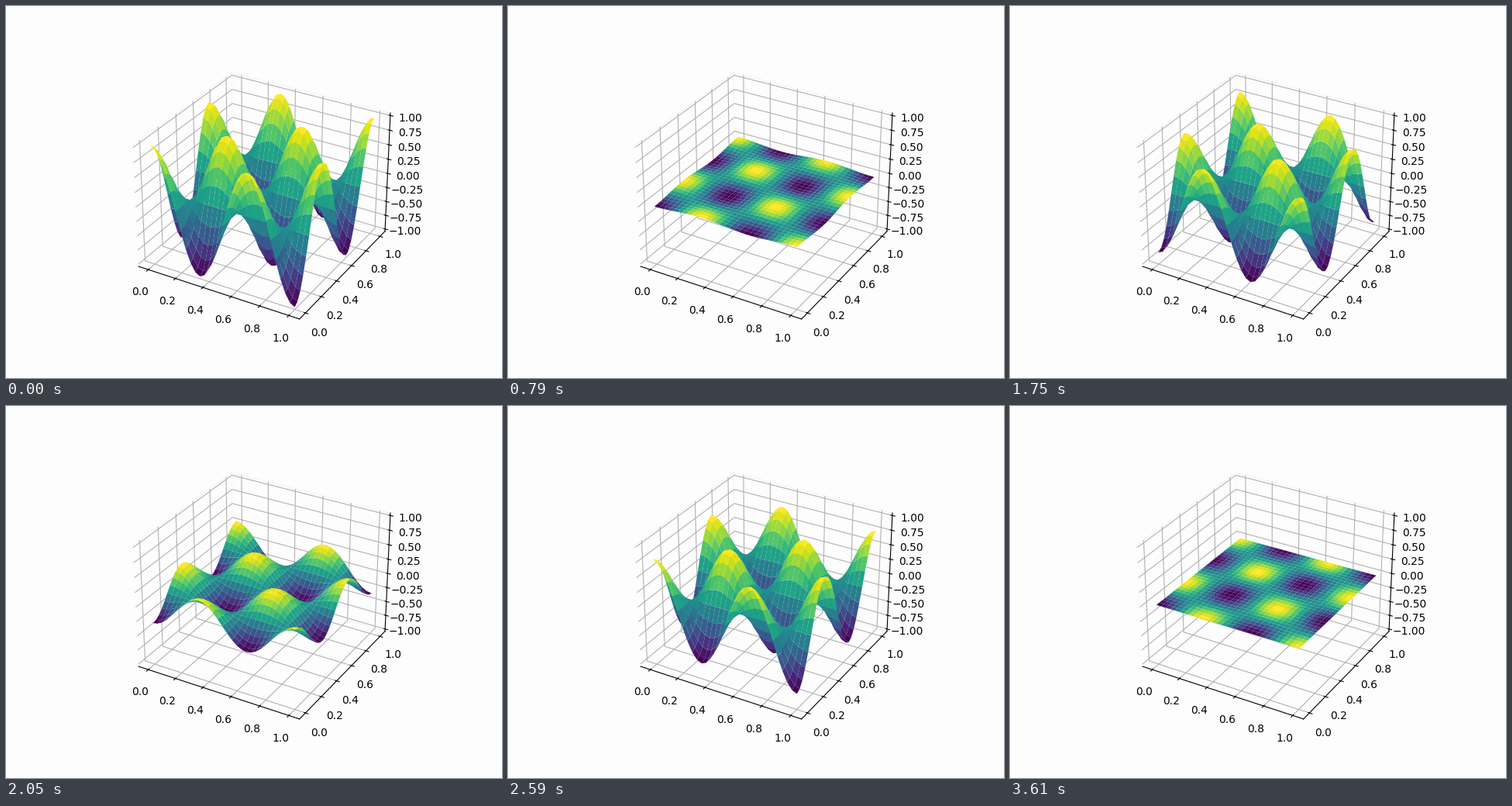
These frames come from a looping animation (640x480 px, 3.67 s). A matplotlib script:

```python
import numpy as np
import matplotlib.pyplot as plt
from matplotlib.animation import FuncAnimation

LOOP_MS = 3670
POSES = 60
FRAMES = POSES + 1      # one pose is held for two frames
HOLD = 4
CELLS = 30
PAPER = (253 / 255, 253 / 255, 253 / 255, 1.0)

fig = plt.figure(figsize=(6.4, 4.8), dpi=100, facecolor=PAPER)
ax = fig.add_subplot(projection="3d", facecolor=PAPER)

pad = 1 / 48
ax.set_xlim(-0.05, 1.05, view_margin=pad)
ax.set_ylim(-0.05, 1.05, view_margin=pad)
ax.set_zlim(-1, 1, view_margin=pad)
ax.set_xticks(np.linspace(0, 1, 6))
ax.set_yticks(np.linspace(0, 1, 6))
ax.set_zticks(np.linspace(-1, 1, 9))
for axis in (ax.xaxis, ax.yaxis, ax.zaxis):
    axis.set_pane_color(PAPER)
    axis.pane.set_edgecolor("#f5f5f5")

side = np.linspace(0, 1, CELLS + 1)
X, Y = np.meshgrid(side, side)
MODE = np.cos(3 * np.pi * X) * np.cos(3 * np.pi * Y)

surface = None


def update(i):
    """Draw the standing wave; colours span each pose's own height range."""
    global surface
    if surface is not None:
        surface.remove()
    pose = i if i <= HOLD else i - 1
    # The small offset keeps the flat last pose just past its zero crossing.
    phase = 2.5 * np.pi * pose / (POSES - 1) + 1e-9
    surface = ax.plot_surface(X, Y, MODE * np.cos(phase), cmap="viridis",
                              rstride=1, cstride=1)
    return [surface]


anim = FuncAnimation(fig, update, frames=FRAMES, init_func=lambda: [],
                     interval=LOOP_MS / FRAMES, repeat=True, repeat_delay=0,
                     blit=False)
plt.show()
```
